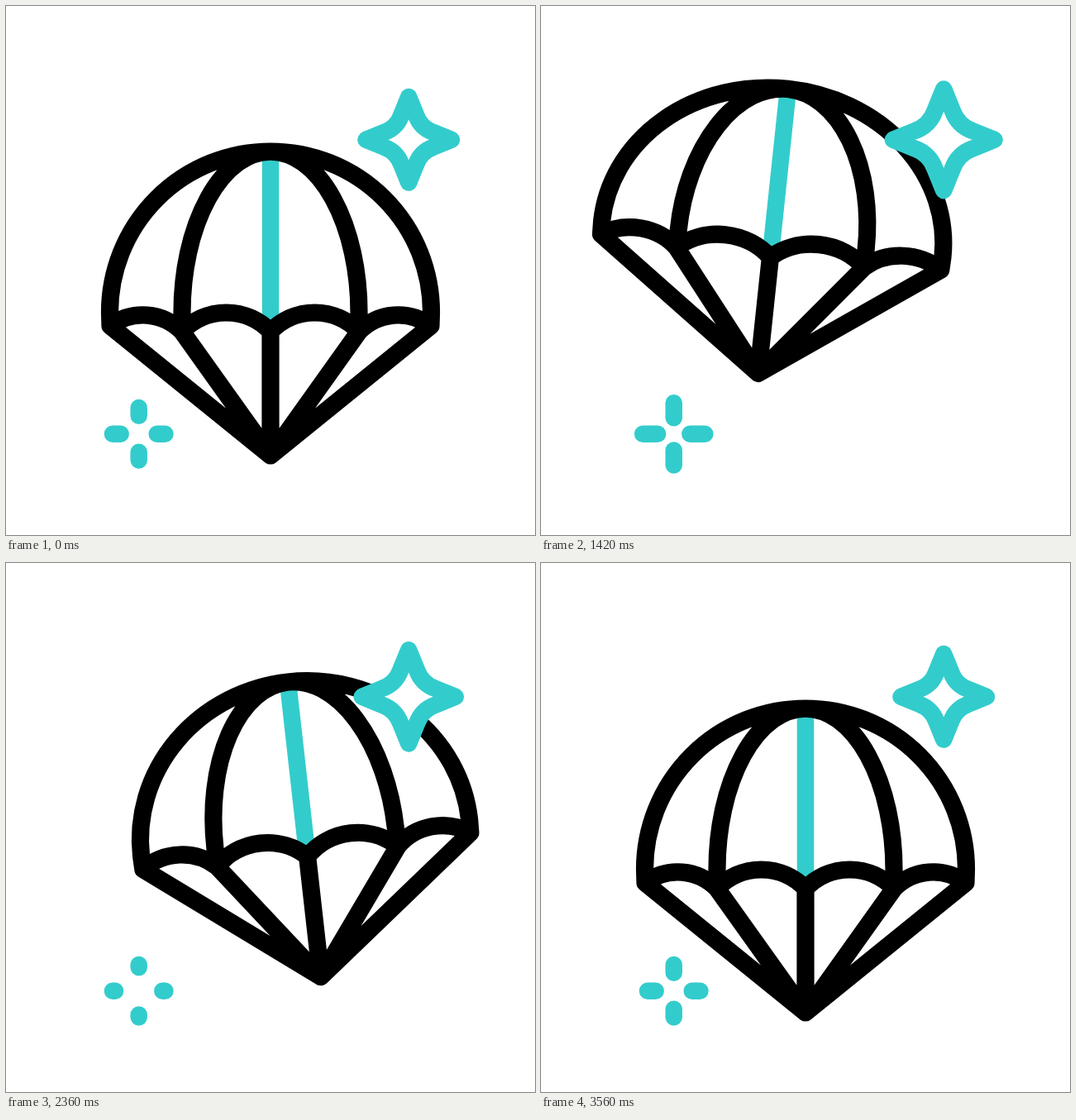
Write an HTML page with a canvas that moves like this. It is 640x640 px and loops after 3.6 s.

```html
<!DOCTYPE html>
<html lang="en">
<head>
<meta charset="utf-8">
<title>Parachute</title>
<style>
  html, body { margin: 0; width: 100%; height: 100%; overflow: hidden; background: #fff; }
  canvas { display: block; width: 640px; height: 640px; }
</style>
</head>
<body>
<canvas id="stage" width="640" height="640"></canvas>
<script>
const ctx = document.getElementById("stage").getContext("2d");
const LOOP = 3600;
const WHITE = "#fff";
const BLACK = "#000";
const TEAL = "#33cccc";

// Paths are relative to the middle of each figure.
const canopy = new Path2D(
  "M0 184L-194 27L-194.5 10.5A194.5 194.5 0 0 1 194.5 10.5L194 27Z" +
  "M0 184L-107 34V10.5A107 194.5 0 0 1 107 10.5V34L0 184V34" +
  "M-194 27A66 66 0 0 1 -107 34A73.7 73.7 0 0 1 0 34" +
  "A73.7 73.7 0 0 1 107 34A66 66 0 0 1 194 27");
const seam = new Path2D("M0 -184V34");
const star = new Path2D(
  "M0 -51.75L9 -29.6Q14.5 -14.5 29.6 -9L51.75 0L29.6 9Q14.5 14.5 9 29.6" +
  "L0 51.75L-9 29.6Q-14.5 14.5 -29.6 9L-51.75 0L-29.6 -9Q-14.5 -14.5 -9 -29.6Z");

// Progress from 0 to 1 between two times: even, or eased at both ends.
const ramp = (t, from, to) => Math.min(1, Math.max(0, (t - from) / (to - from)));
const ease = (t, from, to) => {
  const u = ramp(t, from, to);
  return u * u * (3 - 2 * u);
};

// Swings to one side (1), across to the other (-1) and back to rest.
const swing = (t, start, end) =>
  ease(t, start, 1560) - 2 * ease(t, 1560, 2372) + ease(t, 2372, end);

// Transforms the path but keeps the line weight.
function place(path, matrix) {
  const placed = new Path2D();
  placed.addPath(path, matrix);
  return placed;
}

function stroke(path, color, width) {
  ctx.strokeStyle = color;
  ctx.lineWidth = width;
  ctx.stroke(path);
}

function drawParachute(t) {
  const rise = 120 * ease(t, 200, 613);
  const sink = 20.8 * ease(t, 613, 960) + 121 * ramp(t, 960, 3160) ** 1.5;
  const rebound = 21.8 * ease(t, 3160, 3560);
  const squeeze = ease(t, 150, 460) - ease(t, 600, 1120);
  const puff = ease(t, 900, 1420) - ease(t, 1420, 3100);

  const matrix = new DOMMatrix()
    .translate(320 - 41 * swing(t, 460, 3104), 360 - rise + sink - rebound)
    .rotate(6.4 * swing(t, 620, 3040))
    .scale(1 - .058 * squeeze + .066 * puff, 1 + .038 * squeeze - .06 * puff);

  ctx.lineCap = "butt";
  stroke(place(seam, matrix), TEAL, 20.5);
  ctx.lineCap = "round";
  stroke(place(canopy, matrix), BLACK, 21.2);
}

// Both sparkles swell, vanish, pop back too large and settle, twice per loop.
function twinkle(t) {
  const second = t >= LOOP / 2;
  const time = second ? t - LOOP / 2 : t;
  const back = second ? 910 : 1000;
  return {
    time,
    away: time < back,
    leave: ramp(time, 390, 810) ** 2,
    pop: ease(time, back, back + 330),
    settle: ease(time, back + 330, back + 540)
  };
}

function drawStar({ time, away, leave, pop, settle }) {
  const scale = away
    ? (1 + .31 * ease(time, 0, 390)) * (1 - leave)
    : 1.31 * pop - .31 * settle;
  if (scale < .03) return;
  const shape = place(star, new DOMMatrix().translate(487.2, 161.8).scale(scale, scale));
  ctx.fillStyle = WHITE;
  ctx.fill(shape);
  stroke(shape, TEAL, 20.5);
}

function drawRays({ time, away, leave, pop, settle }) {
  const outer = away ? 31.75 : 41.5 * pop - 9.75 * settle;
  const inner = away ? 22 + 6 * ease(time, 0, 300) + 3.75 * leave : 18 * pop + 4 * settle;
  if (outer - inner < .3) return;
  const ray = new Path2D(`M${inner} 0H${outer}`);
  for (let turn = 0; turn < 360; turn += 90) {
    stroke(place(ray, new DOMMatrix().translate(160.7, 517.8).rotate(turn)), TEAL, 20.5);
  }
}

function draw(t) {
  ctx.fillStyle = WHITE;
  ctx.fillRect(0, 0, 640, 640);
  ctx.lineJoin = "round";
  drawParachute(t);
  const phase = twinkle(t);
  drawStar(phase);
  drawRays(phase);
}

const start = performance.now();
function tick() {
  draw((performance.now() - start) % LOOP);
  requestAnimationFrame(tick);
}
tick();
</script>
</body>
</html>
```
